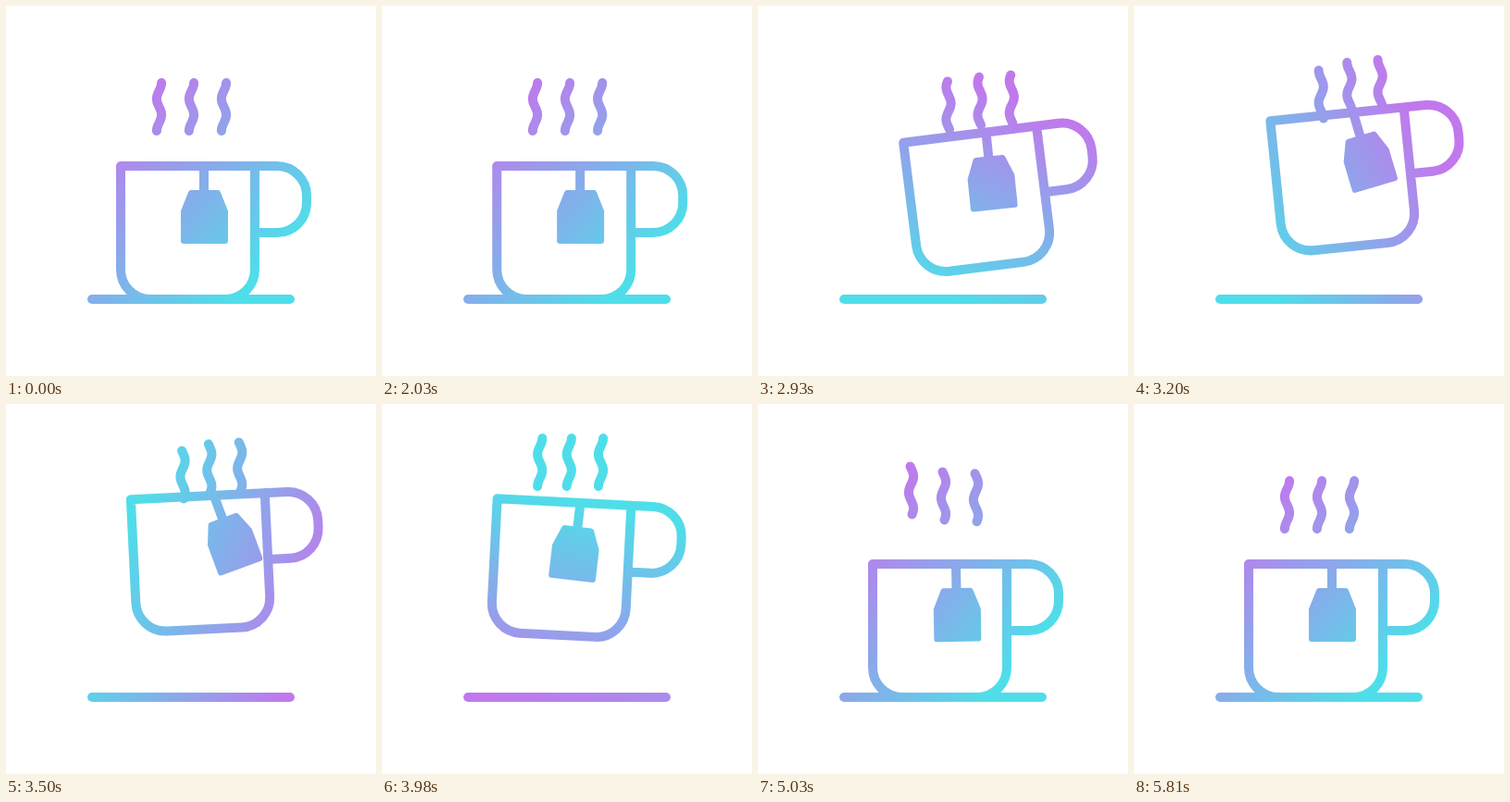
An HTML page that plays this animation: 400x400 px, repeating every 5.87 s.

```html
<!DOCTYPE html>
<html lang="en">
<head>
<meta charset="utf-8">
<title>Tea cup</title>
<style>
  html, body { margin: 0; width: 100%; height: 100%; overflow: hidden; background: #fff; }
  svg { display: block; width: 100vw; height: 100vh; }
  #ink { fill: none; stroke: #fff; stroke-width: 10; stroke-linecap: round; stroke-linejoin: round; }
</style>
</head>
<body>
<svg viewBox="0 0 400 400">
  <defs>
    <linearGradient id="tint" gradientUnits="userSpaceOnUse" x1="119" y1="119" x2="281" y2="281">
      <stop offset="0" stop-color="#c178ec"/>
      <stop offset="1" stop-color="#4fdee9"/>
    </linearGradient>
    <mask id="shape" maskUnits="userSpaceOnUse" x="0" y="0" width="400" height="400">
      <g id="ink">
        <path d="M93 317H307"/>
        <g id="cup">
          <path d="M124 173V285A32 32 0 0 0 156 317H237A32 32 0 0 0 269 285V173M124 173H293A32 32 0 0 1 325 205V213A32 32 0 0 1 293 245H269"/>
          <g id="bag">
            <path d="M214 173V203"/>
            <path d="M200 202H229L237 222V254H192V222Z" fill="#fff" stroke-width="6"/>
          </g>
        </g>
        <path class="wisp"/>
        <path class="wisp"/>
        <path class="wisp"/>
      </g>
    </mask>
  </defs>
  <rect width="400" height="400" fill="url(#tint)" mask="url(#shape)"/>
</svg>
<script>
const LOOP = 5870, START = 2030, STEP = 30;

// Turning points [time, value], joined by half cosine waves
const cup = {
  x: [[2000, 0], [2650, 46], [4100, -4], [4900, 0]],
  y: [[2250, 0], [3700, -77], [4900, 0]],
  tilt: [[2000, 0], [2850, -7.2], [4500, 5.9], [4900, 0]]
};
const swing = [[2000, 0], [2450, 7], [3450, -20.5], [4480, 31.5], [5250, -8.5], [5600, 1.5], [5810, 0]];
const steam = {
  x: [[2000, 0], [2750, 40.5], [4120, 0]],
  y: [[2620, 0], [3720, -46], [3980, -46], [5420, 0]]
};
const turn = [[2000, 0], [5270, 360]];

const $ = id => document.getElementById(id);
const wisps = [...document.querySelectorAll('.wisp')];

const ramp = (t, from, to) => Math.min(1, Math.max(0, (t - from) / (to - from)));

function at(keys, t) {
  let value = keys[0][1];
  for (let i = 1; i < keys.length; i++) {
    const u = ramp(t, keys[i - 1][0], keys[i][0]);
    value += (keys[i][1] - keys[i - 1][1]) * (1 - Math.cos(Math.PI * u)) / 2;
  }
  return value;
}

// A short upright wave; raising the phase makes it climb
function wave(x, y, phase) {
  const points = [];
  for (let s = 0; s <= 52; s += 2) {
    points.push(`${x + 2.6 * Math.cos(Math.PI * s / 17.33 + phase)} ${y + s}`);
  }
  return 'M' + points.join('L');
}

function draw(now) {
  const time = now % LOOP;
  const t = time < START ? 0 : START + Math.floor((time - START) / STEP) * STEP;
  const tilt = at(cup.tilt, t);
  $('cup').setAttribute('transform', `translate(${at(cup.x, t)} ${at(cup.y, t)}) rotate(${tilt} 196.5 245)`);
  $('bag').setAttribute('transform', `rotate(${at(swing, t) - tilt} 214 173)`);
  $('tint').setAttribute('gradientTransform', `rotate(${at(turn, t)} 209 209)`);

  const phase = 4 * Math.PI * ramp(t, 2450, 5510);
  wisps.forEach((wisp, i) => {
    const late = t - 45 * (2 - i) ** 2;
    wisp.setAttribute('d', wave(165.5 + 35 * i + at(steam.x, late), 83 + at(steam.y, late), phase));
  });
}

const begin = performance.now();
function tick() {
  draw(performance.now() - begin);
  requestAnimationFrame(tick);
}
tick();
</script>
</body>
</html>
```
